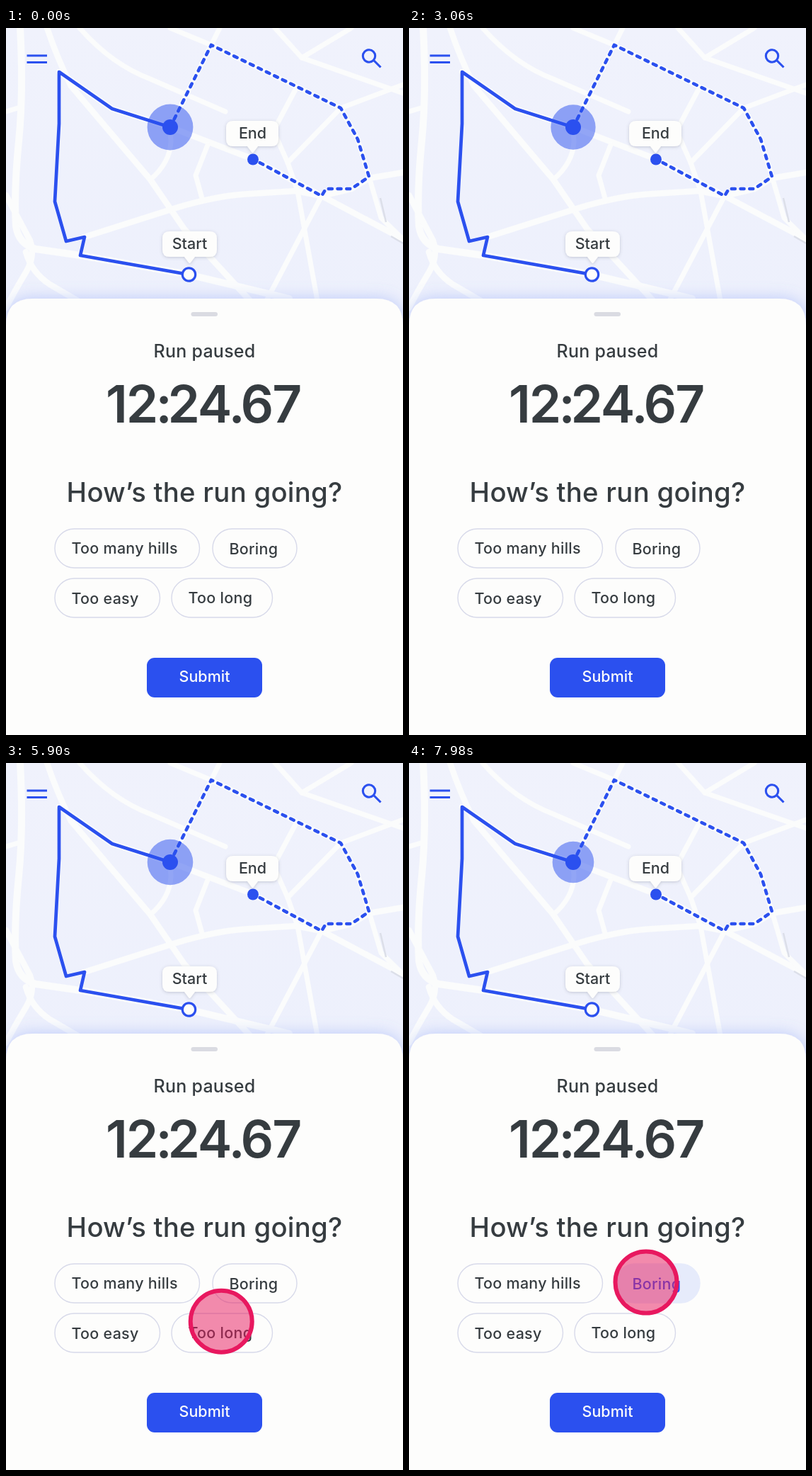
Recreate the animation shown at these times as an HTML page. Size 561 px wide and 998 px high, loop 8000 ms.

```html
<!DOCTYPE html>
<html lang="en">
<head>
<meta charset="utf-8">
<title>Run paused</title>
<style>
  html, body { margin: 0; width: 100%; height: 100%; overflow: hidden; background: #fdfdfc; }
  svg { display: block; width: 100%; height: 100%; }
  text { font-family: Inter, Roboto, sans-serif; font-weight: 500; font-size: 21.5px; fill: #363c40; }
  .mid { text-anchor: middle; }
  .bold { font-weight: 550; letter-spacing: .25px; }
  .timer { font-weight: 560; font-size: 73px; letter-spacing: -2px; }
  .roads path { fill: none; stroke: #fbfcfc; stroke-linecap: round; stroke-linejoin: round; }
  .line { fill: none; stroke: #2b50ef; stroke-linejoin: round; stroke-linecap: round; }
  .icon { fill: none; stroke: #2b50ef; stroke-width: 3.1; }
  .chip { fill: #fdfdfc; stroke: #d8daea; stroke-width: 1.4; }
  .tag { fill: #fdfdfc; filter: url(#soft); }
</style>
</head>
<body>
<svg viewBox="0 0 561 998" preserveAspectRatio="none">
  <defs>
    <linearGradient id="land" x2="0" y2="1">
      <stop stop-color="#f0f2fc"/>
      <stop offset="1" stop-color="#edf0fc"/>
    </linearGradient>
    <filter id="soft" x="-30%" y="-30%" width="160%" height="170%">
      <feDropShadow dx="0" dy="1" stdDeviation="2" flood-color="#4a5068" flood-opacity=".28"/>
    </filter>
    <filter id="glow" x="-10%" y="-10%" width="120%" height="120%">
      <feDropShadow dx="0" dy="0" stdDeviation="11" flood-color="#6f8cf5" flood-opacity=".4"/>
    </filter>
  </defs>

  <rect width="561" height="440" fill="url(#land)"/>
  <g class="roads">
    <g stroke-width="8.5">
      <path stroke-width="10" d="M20 0Q25 90 18 160T14 280Q18 305 42 312L105 321L258 348L400 382"/>
      <path d="M0 236L34 300Q42 322 28 345T0 395"/>
      <path d="M28 316Q36 345 62 362L110 390"/>
      <path d="M58 0Q72 42 92 82L204 214L252 284L345 385"/>
      <path d="M75 62L150 114L232 140L349 185L446 237L561 298"/>
      <path d="M111 295L240 254Q300 236 345 234L410 230L446 237L488 227L513 212L561 204"/>
    </g>
    <g stroke-width="7">
      <path d="M0 118L20 112"/>
      <path d="M104 0Q150 52 204 72L310 118"/>
      <path d="M204 214Q232 190 233 160L232 140L290 24L302 0"/>
      <path d="M232 0L290 24L473 113L561 80"/>
      <path d="M410 85L378 145L398 190L412 230L440 385"/>
      <path d="M473 113L398 190"/>
      <path d="M446 237L368 385"/>
      <path d="M285 165L268 208L278 244"/>
      <path d="M380 0L418 42L561 92"/>
      <path d="M418 42L488 0"/>
      <path d="M473 113L497 157L513 210L530 268L561 298"/>
    </g>
  </g>
  <path d="M529 240L537 274M544 294L561 304" fill="none" stroke="#dcdfe9" stroke-width="2.5"/>

  <path class="icon" d="M29.500 39H58M29.500 48.500H58M519.500 45.500L529.500 55.500"/>
  <circle class="icon" cx="513" cy="39.500" r="8.700"/>

  <path class="line" stroke-width="4.600" stroke-dasharray="5 7.720"
    d="M232 140L290 24L473 113L497 157L513 210L488 227H452L446 237L349 185"/>
  <path class="line" stroke-width="4.700"
    d="M258 348L105 321L111 295L85 301L69 245L75 135V62L150 114L232 140"/>
  <circle id="halo" cx="232" cy="140" r="32" fill="#2b50ef" opacity=".5"/>
  <circle cx="232" cy="140" r="11" fill="#2b50ef"/>
  <circle cx="349" cy="185.500" r="8" fill="#2b50ef"/>
  <circle cx="258.500" cy="348" r="9.200" fill="#fdfdfc" stroke="#2b50ef" stroke-width="3.200"/>

  <path class="tag" d="M321 131H375Q385 131 385 141V157Q385 167 375 167H356L350 175Q348.500 177 347 175L341 167H321Q311 167 311 157V141Q311 131 321 131Z"/>
  <text class="mid" x="348.500" y="156">End</text>
  <path class="tag" d="M231 287H288Q298 287 298 297V313Q298 323 288 323H267L261 331Q259.500 333 258 331L252 323H231Q221 323 221 313V297Q221 287 231 287Z"/>
  <text class="mid" x="259.500" y="312">Start</text>

  <path d="M0 998V420Q0 382 38 382H523Q561 382 561 420V998Z" fill="#fdfdfc" filter="url(#glow)"/>
  <rect x="261.500" y="401" width="37.500" height="6" rx="3" fill="#dadbe2"/>
  <text class="bold mid" x="280.500" y="465" style="font-size:25px">Run paused</text>
  <text class="timer" y="557"><tspan x="141">12</tspan><tspan x="211.500">:</tspan><tspan x="228.500">24</tspan><tspan x="314.500">.</tspan><tspan x="331.500">67</tspan></text>
  <text class="bold mid" x="280.500" y="669" style="font-size:38.3px">How’s the run going?</text>

  <g id="chips"></g>

  <rect x="199" y="889" width="163" height="56" rx="11" fill="#2b50ef"/>
  <text class="mid" x="280.500" y="923" style="fill:#fdfdfc">Submit</text>

  <circle id="touch" fill="#e8185f" fill-opacity=".5" stroke="#e8185f" stroke-width="6"/>
</svg>
<script>
const LOOP = 8000;
const NS = 'http://www.w3.org/2000/svg';
const $ = id => document.getElementById(id);

function add(parent, tag, attrs, label) {
  const el = document.createElementNS(NS, tag);
  for (const k in attrs) el.setAttribute(k, attrs[k]);
  if (label) el.textContent = label;
  return parent.appendChild(el);
}

// label, left, top, width, text baseline
const chips = [
  ['Too many hills', 69, 707, 204.5, 742],
  ['Boring', 292, 707, 119, 743],
  ['Too easy', 69, 777, 148.5, 813],
  ['Too long', 234, 777, 142.5, 812]
].map(([label, x, y, width, base]) => ({
  box: add($('chips'), 'rect', { class: 'chip', x, y, width, height: 55, rx: 27.5 }),
  text: add($('chips'), 'text', { class: 'bold', x: x + 23.5, y: base }, label)
}));
const boring = chips[1];

const ease = u => (1 - Math.cos(Math.PI * u)) / 2;
const ramp = (t, from, to) => ease(Math.min(1, Math.max(0, (t - from) / (to - from))));
const mix = (a, b, u) => a + (b - a) * u;
const blend = (a, b, u) => `rgb(${a.map((v, i) => Math.round(mix(v, b[i], u)))})`;

// Turning points of the halo: time, radius
const pulse = [
  [0, 32.4], [900, 22], [1720, 32.4], [2400, 22], [2900, 32.4], [3820, 22],
  [4820, 32.4], [5440, 29], [5960, 32.4], [6500, 24], [7020, 32.4], [7600, 22], [8200, 32.4]
];

function haloRadius(t) {
  const i = pulse.findIndex(p => p[0] > t);
  const [t0, r0] = pulse[i - 1], [t1, r1] = pulse[i];
  return mix(r0, r1, ramp(t, t0, t1));
}

function draw(t) {
  $('halo').setAttribute('r', haloRadius(t));

  const move = ramp(t, 5400, 6345);
  const press = ramp(t, 6780, 7010) - ramp(t, 7060, 7300);
  const touch = $('touch');
  touch.setAttribute('cx', mix(267, 335, move));
  touch.setAttribute('cy', mix(855, 733, move));
  touch.setAttribute('r', mix(43.5, 34.3, press));
  touch.setAttribute('opacity', ramp(t, 5420, 5620));

  const on = ramp(t, 6960, 7220);
  boring.box.style.fill = blend([253, 253, 252], [230, 235, 251], on);
  boring.box.style.stroke = blend([216, 218, 234], [230, 235, 251], on);
  boring.text.style.fill = blend([54, 60, 64], [43, 80, 239], on);
}

const start = performance.now();
function tick() {
  draw(Math.max(0, performance.now() - start) % LOOP);
  requestAnimationFrame(tick);
}
tick();
</script>
</body>
</html>
```
